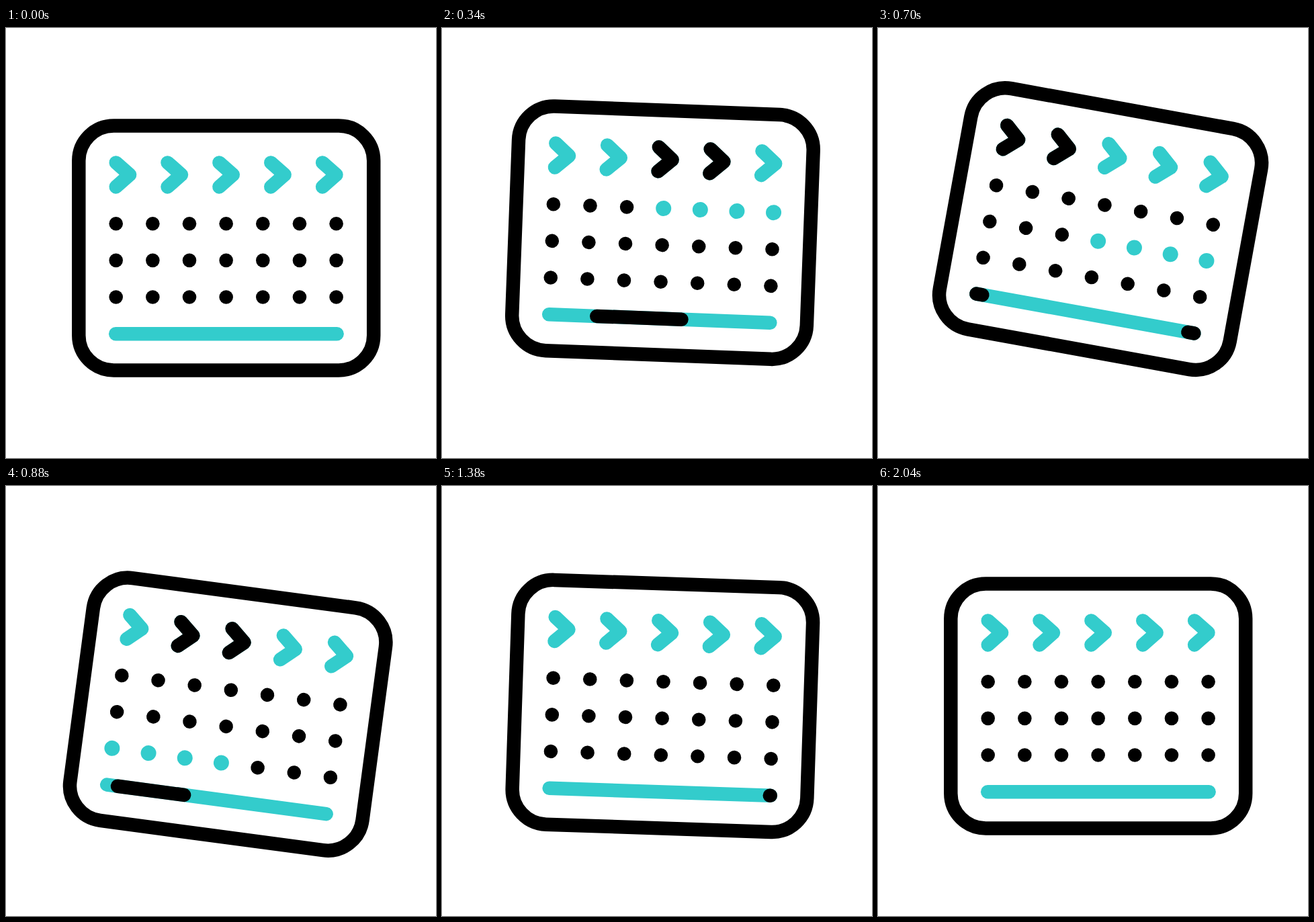
Animation of 640x640 px, one loop 2.4 s. Source, as an HTML page:

```html
<!DOCTYPE html>
<html lang="en">
<head>
<meta charset="utf-8">
<title>Calendar</title>
<style>
  html, body { margin: 0; width: 100%; height: 100%; overflow: hidden; background: #fff; }
  svg { display: block; width: 100vw; height: 100vh; }
  .line { fill: none; stroke-width: 20.5; stroke-linecap: round; stroke-linejoin: round; }
</style>
</head>
<body>
<svg id="stage" viewBox="0 0 640 640">
  <g id="card">
    <rect class="line" x="108.3" y="145.4" width="438.9" height="364" rx="52" stroke="#000"/>
  </g>
</svg>
<script>
const LOOP = 2400, STEP = 20;
const CYAN = '#33cccc', BLACK = '#000';
const PIVOT = [327.6, 345.8];
const BAR = { x: 163.2, y: 455.3, length: 329.4 };

// [time, value] pairs, eased between neighbours
const LIFT = [[0, 0], [600, -38], [1040, 33.5], [1232, 0]];
const TILT = [[214, 0], [640, 10.28], [780, 10.28], [1180, -6.88], [1480, 5], [1760, -2.5], [2040, 0]];

const card = document.getElementById('card');

function add(tag, attrs) {
  const el = document.createElementNS('http://www.w3.org/2000/svg', tag);
  for (const key in attrs) el.setAttribute(key, attrs[key]);
  return card.appendChild(el);
}

const clamp = v => Math.min(1, Math.max(0, v));
const ramp = (t, from, span) => clamp((t - from) / span);
const ease = v => v * v * (3 - 2 * v);

function track(keys, t) {
  let value = keys[0][1];
  for (let i = 1; i < keys.length; i++) {
    const [t0, v0] = keys[i - 1], [t1, v1] = keys[i];
    if (t >= t0) value = v0 + (v1 - v0) * ease(ramp(t, t0, t1 - t0));
  }
  return value;
}

// Fades in from start, fades out from end
const pulse = (t, start, end, fade) => ramp(t, start, fade) - ramp(t, end, fade);

const chevrons = [];
for (let i = 0; i < 5; i++) {
  const d = `M${163.7 + 76.85 * i} 200.4l20.4 18-20.4 18`;
  add('path', { class: 'line', d, stroke: CYAN });
  chevrons.push(add('path', { class: 'line', d, stroke: BLACK }));
}

const dots = [];
for (let row = 0; row < 3; row++) {
  for (let col = 0; col < 7; col++) {
    const spot = { cx: 163.7 + 54.65 * col, cy: 291.2 + 54.65 * row };
    add('circle', { ...spot, r: 10.3, fill: BLACK });
    dots.push({ el: add('circle', { ...spot, r: 11.5, fill: CYAN }), start: 360 * row + 40 * col });
  }
}

add('path', { class: 'line', d: `M${BAR.x} ${BAR.y}h${BAR.length}`, stroke: CYAN });
const runners = [0, 640].map(start => ({ el: add('path', { class: 'line', stroke: BLACK }), start }));

function draw(t) {
  const [px, py] = PIVOT;
  card.setAttribute('transform',
    `translate(0 ${track(LIFT, t)}) rotate(${track(TILT, t)} ${px} ${py})`);

  chevrons.forEach((el, i) => {
    const at = start => pulse(t, start + 100 * i, start + 100 * i + 200, 20);
    el.setAttribute('opacity', Math.max(at(0), at(580)));
  });

  for (const { el, start } of dots) {
    el.setAttribute('opacity', pulse(t, start, start + 220, 40));
  }

  for (const { el, start } of runners) {
    const head = BAR.length * ease(ramp(t, start, 600));
    const tail = BAR.length * ease(ramp(t, start + 160, 600));
    el.setAttribute('d', head > tail ? `M${BAR.x + tail} ${BAR.y}h${head - tail}` : '');
  }
}

const origin = performance.now();
function tick() {
  const t = (performance.now() - origin) % LOOP;
  draw(Math.floor(t / STEP) * STEP);
  requestAnimationFrame(tick);
}
draw(0);
requestAnimationFrame(tick);
</script>
</body>
</html>
```
